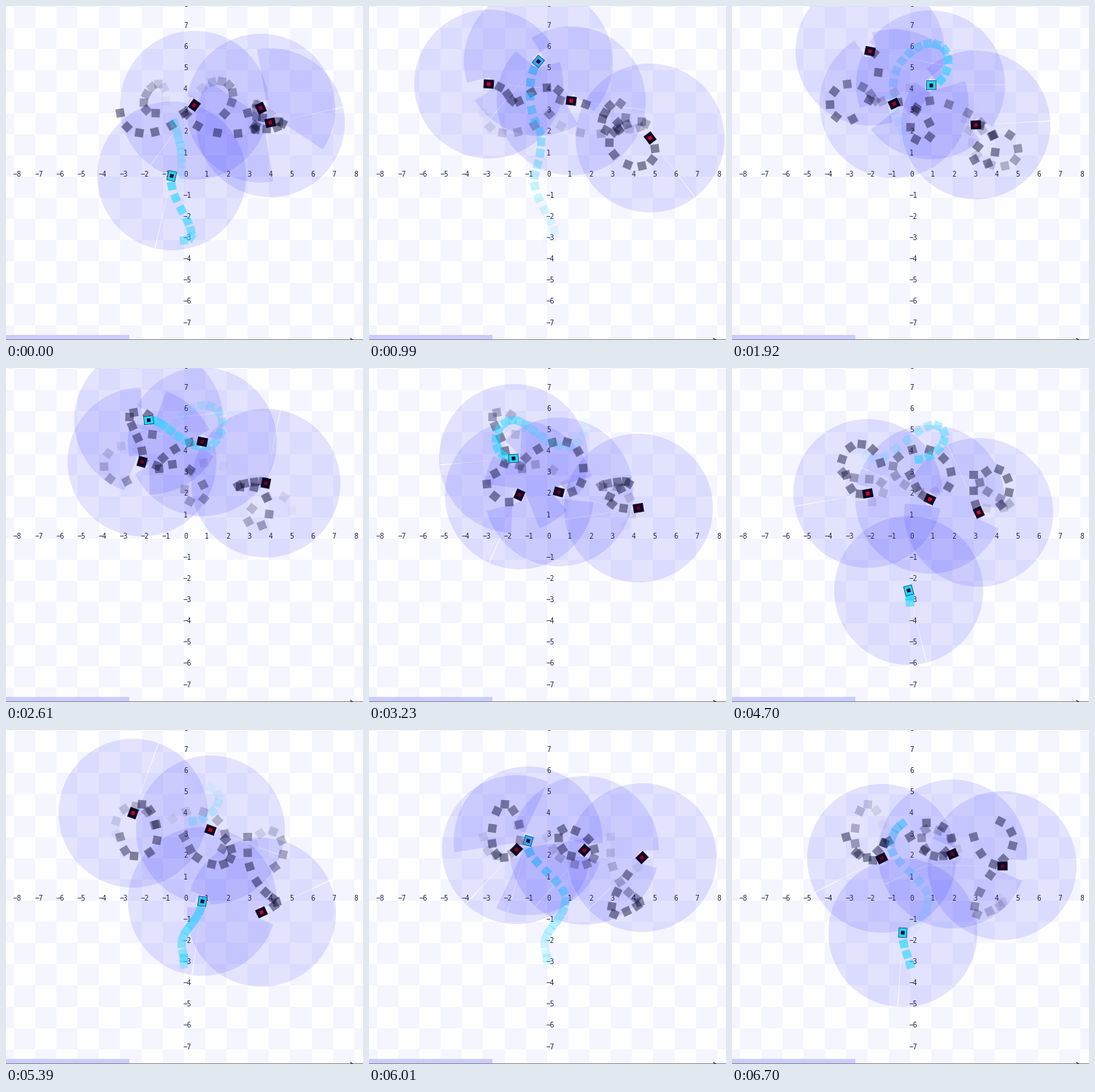
Write a matplotlib script that moves like this. It is 489x458 px and loops after 6780 ms.

```python
import numpy as np
import matplotlib.pyplot as plt
from matplotlib.animation import FuncAnimation
from matplotlib.collections import PolyCollection
from matplotlib.patches import Rectangle

W, H, DPI = 489, 458, 64
OX, OY, UNIT = 243.8, 234, 29.12
LOOP, TICK, STEPS = 6780, 30, 88
RANGE, BODY, LIFE = 102, 9.2, 23

# Steps at which the robots pass their key poses, one row per run.
TIMES = [(-22, -10),
         (-9, 0, 6, 13, 19, 25, 36, 42, 50, 57),
         (57, 61, 70, 78, 83),
         (83, 87)]


def facing(deg):
    """Unit vector on screen, angles counted counter-clockwise."""
    a = np.radians(deg)
    return np.array([np.cos(a), -np.sin(a)])


def square(c, ang, size, aspect=1):
    r = size / 2 * np.array([[-1, -1], [1, -1], [1, 1], [-1, 1]]) * [1, aspect]
    co, si = np.cos(ang), np.sin(ang)
    return c + r @ np.array([[co, si], [-si, co]])


class Run:
    """Drive through poses (x, y, heading) at a steady cruising speed."""

    def __init__(self, times, poses, speed):
        self.t = np.array(times, float)
        self.p = np.array([q[:2] for q in poses], float)
        self.v = np.array([speed * facing(q[2]) for q in poses])
        self.start, self.end = self.t[0], self.t[-1]

    def pose(self, s):
        i = np.clip(np.searchsorted(self.t, s, "right") - 1, 0, len(self.t) - 2)
        h = self.t[i + 1] - self.t[i]
        u = (s - self.t[i]) / h
        a, m, n = self.p[i], self.v[i] * h, self.v[i + 1] * h
        d = self.p[i + 1] - a
        c2, c3 = 3 * d - 2 * m - n, m + n - 2 * d
        vel = m + 2 * u * c2 + 3 * u * u * c3
        return a + u * (m + u * (c2 + u * c3)), np.arctan2(vel[1], vel[0])


class Robot:
    """Starts every run at its home cell, in the given starting direction."""

    def __init__(self, home, speed, drop, past, starts, *runs):
        x, y = OX + home[0] * UNIT, OY - home[1] * UNIT
        legs = [past] + [[(x, y, a)] + r for a, r in zip(starts, runs)]
        self.runs = [Run(t, leg, speed) for t, leg in zip(TIMES, legs)]
        self.marks = [(t, t - r.start, square(*r.pose(t), 11.5))
                      for r in self.runs
                      for t in np.arange(r.start, r.end, drop)]

    def pose(self, s):
        return [r for r in self.runs if r.start <= s][-1].pose(s)

    def trail(self, s):
        return [(age, 1 - (s - t) / LIFE, q) for t, age, q in self.marks
                if .3 < s - t < LIFE]


lead = Robot(
    (0, -3), 11, 1.3, [(240, 250, 90), (229, 158, 110)], (5, 95, 105),
    [(227, 233, 77), (231, 165, 120), (232, 76, 50), (287, 56, -35),
     (272, 108, 180), (181, 80, 228), (198, 124, 5), (286, 82, -40),
     (245, 124, 160)],
    [(242, 305, 104), (269, 235, 82), (218, 152, 74), (243, 122, 35)],
    [(234, 278, 86)])
left = Robot(
    (-3, 3), 16, 1.6, [(219, 130, 90), (216, 146, 10)], (-80, -75, -75),
    [(258, 136, 54), (215, 124, 220), (164, 107, 176), (153, 157, -15),
     (189, 62, 169), (170, 146, 205), (206, 174, 66), (150, 128, 75),
     (205, 136, -80)],
    [(186, 172, 10), (174, 114, 250), (202, 164, 47), (219, 150, 30)],
    [(205, 176, 27)])
mid = Robot(
    (0, 3), 16, 1.6, [(255, 130, 60), (291, 156, 220)], (-60, -60, -60),
    [(349, 140, 114), (332, 172, 0), (277, 130, 173), (262, 184, 10),
     (222, 134, 205), (288, 117, -65), (260, 170, 165), (244, 113, 20),
     (293, 168, 230)],
    [(271, 180, -25), (280, 137, 160), (295, 165, 49), (260, 128, 190)],
    [(302, 170, 24)])
right = Robot(
    (3, 3), 16, 1.6, [(380, 160, 150), (340, 181, -100)], (-75, -90, -75),
    [(362, 160, 192), (342, 210, -40), (385, 181, 127), (340, 216, -15),
     (334, 163, 183), (342, 167, 205), (369, 192, 9), (346, 144, 40),
     (363, 191, 205)],
    [(338, 198, -65), (350, 250, 205), (374, 175, 44), (362, 123, 160)],
    [(370, 186, 0)])
team = [left, mid, right]


def scan(c, ang, others):
    """Sensor fan, shortened where another robot blocks the view."""
    a = np.linspace(-np.pi + .006, np.pi - .006, 361)
    r = np.full(a.size, float(RANGE))
    for o in others:
        d = np.hypot(*(o - c))
        if d > RANGE:
            continue
        to = np.arctan2(o[1] - c[1], o[0] - c[0])
        off = np.abs((a + ang - to + np.pi) % (2 * np.pi) - np.pi)
        hit = off < np.arcsin(min(BODY / d, 1))
        r[hit] = np.minimum(r[hit], max(d - BODY / 2, 4))
    ray = np.column_stack([np.cos(a + ang), np.sin(a + ang)])
    return np.vstack([c, c + r[:, None] * ray])


def lead_color(age, alpha):
    """Cyan, turning blue in the middle of a run."""
    blue = np.exp(-((age - 20) / 7) ** 2)
    return (.13 + .07 * blue, .85 - .2 * blue, 1, alpha)


fig = plt.figure(figsize=(W / DPI, H / DPI), dpi=DPI, facecolor="#fefefe")
ax = fig.add_axes([0, 0, 1, 1])
ax.set(xlim=(0, W), ylim=(H, 0))
ax.axis("off")

cells = [square(np.array([OX + (i + .5) * UNIT, OY - (j + .5) * UNIT]), 0, UNIT)
         for i in range(-9, 9) for j in range(-8, 9) if (i + j) % 2]
ax.add_collection(PolyCollection(cells, fc="#f5f5ff", ec="none",
                                 antialiased=False, zorder=0))

label = dict(family="DejaVu Sans Mono", size=9.5 * 72 / DPI, color="#26264f",
             zorder=3, clip_on=True)
for k in range(-8, 9):
    name = str(k).replace("-", "\u2212")
    ax.text(OX + k * UNIT - .8, OY - .3, name, **label)
    if k:
        ax.text(OX - .8, OY - k * UNIT - .3, name, **label)

ax.add_patch(Rectangle((0, 451), 169, 7, fc="#ccccff", ec="none", zorder=8))
ax.add_patch(Rectangle((0, 457), W, 1, fc="#8c8c96", ec="none", zorder=9))
ax.plot([472, 475], [456, 458], color="#202030", lw=1.3, zorder=10)


def layer(z, **kw):
    return ax.add_collection(PolyCollection([], zorder=z, **kw))


fans = layer(1, fc=(.05, .05, 1, .11), ec="none")
trails = layer(4, ec="none")
bodies = layer(6, lw=.9)


def draw(n):
    s = min(int((n * TICK + TICK - 1) * STEPS / LOOP), STEPS - 1)
    poses = [r.pose(s) for r in team + [lead]]
    spots = [p for p, _ in poses]
    fans.set_verts([scan(p, a, spots[:i] + spots[i + 1:])
                    for i, (p, a) in enumerate(poses)])

    marks = [(q, (.06, .06, .2, .47 * min(1, 1.8 * k)))
             for r in team for _, k, q in r.trail(s)]
    marks += [(q, lead_color(age, .7 * k)) for age, k, q in lead.trail(s)]
    trails.set_verts([q for q, _ in marks])
    trails.set_facecolor([c for _, c in marks])

    glow = .55 + .25 * np.sin(s / 8)
    clear = (0, 0, 0, 0)
    parts = []
    for p, a in poses[:3]:
        parts += [(square(p, a, 14, .86), (.06, .01, .16, 1), clear),
                  (square(p, a, 5), (.06 + glow, .02, .1, 1), clear)]
    p, a = poses[3]
    age = s - max(t[0] for t in TIMES if t[0] <= s)
    parts += [(square(p, a, 13, .86), lead_color(age, 1), (.12, .25, .42, 1)),
              (square(p, a, 5), (.02, .02, .1, 1), clear)]
    verts, face, edge = zip(*parts)
    bodies.set_verts(verts)
    bodies.set_facecolor(face)
    bodies.set_edgecolor(edge)
    return fans, trails, bodies


ani = FuncAnimation(fig, draw, frames=LOOP // TICK, interval=TICK,
                    repeat=True, repeat_delay=0)
plt.show()
```
